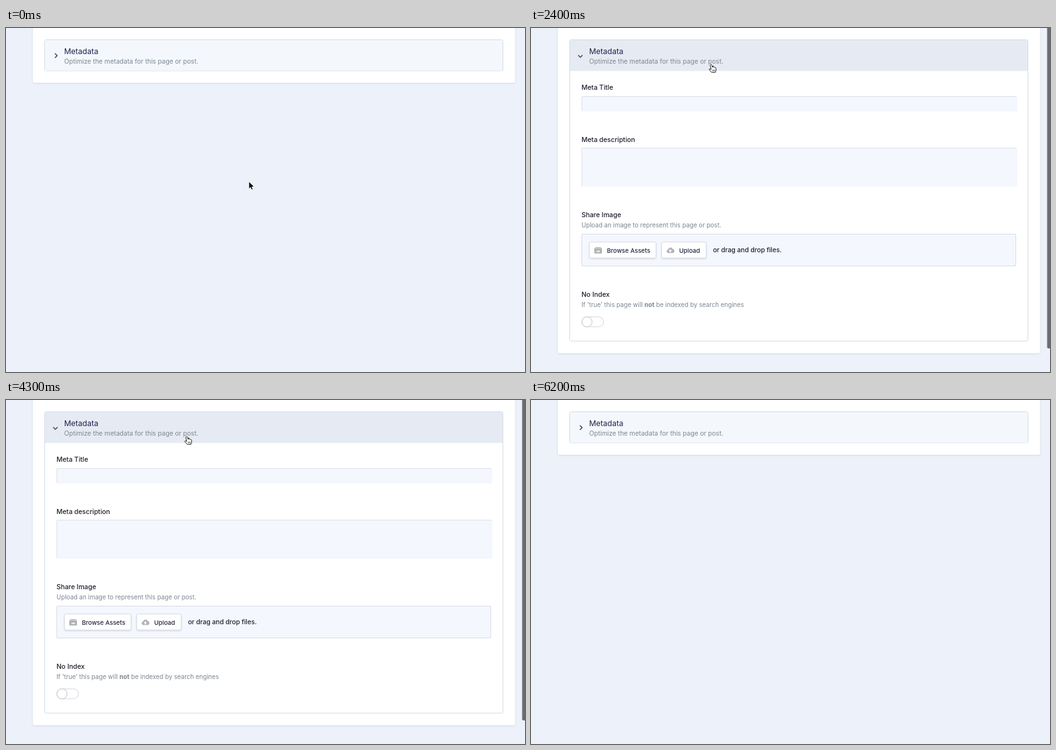
An HTML page for the animation above (6.5 s loop, 812x540 px).

```html
<!DOCTYPE html>
<html lang="en">
<head>
<meta charset="utf-8">
<title>Metadata panel</title>
<style>
  html, body { margin: 0; width: 100%; height: 100%; overflow: hidden; background: #edf2fa; }
  svg { display: block; width: 812px; height: 540px; }
  text { font-family: Inter, "Open Sans", sans-serif; fill: #1d1f2b; }
  .title { font-size: 12px; fill: #20224a; }
  .sub { font-size: 10.1px; fill: #7c8791; }
  .label { font-size: 10.4px; font-weight: 500; }
  .hint { font-size: 9.72px; fill: #7c8791; }
  .button { font-size: 9.6px; font-weight: 500; fill: #24263f; }
  .drop { font-size: 10.2px; font-weight: 500; }
  .card { fill: #fff; filter: drop-shadow(0 1px 1.5px #a9b4c566); }
  .panel { fill: #fff; stroke: #d5dce6; }
  .field { fill: #f4f7fd; }
  .edge { stroke: #dae0e9; fill: none; }
  .btn { fill: #fff; stroke: #d9dee7; filter: drop-shadow(0 1px 1px #8a94a855); }
  .icon { fill: #b1b3b7; }
  .chevron { fill: none; stroke: #42465c; stroke-width: 1.5; stroke-linecap: round; stroke-linejoin: round; }
</style>
</head>
<body>
<svg viewBox="0 0 812 540">
  <rect width="812" height="540" fill="#edf2fa"/>
  <rect id="card" class="card" x="42" y="-10" width="754.5" height="96" rx="3"/>
  <rect id="panel" class="panel" x="60.5" y="18.5" width="717" height="49.5" rx="2"/>
  <path id="head" d="M61 19H777V67.5H61Z"/>
  <path id="chevron" class="chevron"/>
  <text class="title" x="91" y="41">Metadata</text>
  <text class="sub" x="91" y="56">Optimize the metadata for this page or post.</text>

  <g id="form">
    <text class="label" x="79" y="97.3">Meta Title</text>
    <rect class="field" x="79" y="107" width="682" height="24" rx="2"/>
    <path class="edge" d="M79.5 130V109Q79.5 107.5 81 107.5H759"/>

    <text class="label" x="79" y="178.8">Meta description</text>
    <rect class="field" x="79" y="188" width="682" height="61" rx="2"/>
    <path class="edge" d="M79.5 248V190Q79.5 188.5 81 188.5H759"/>

    <text class="label" x="79" y="296.8">Share Image</text>
    <text class="hint" x="79" y="313.4">Upload an image to represent this page or post.</text>
    <rect x="79.5" y="323.5" width="679" height="50" rx="1.5" fill="#f4f7fd" stroke="#d5dce6"/>
    <rect class="btn" x="91.5" y="336" width="104" height="25" rx="2"/>
    <g class="icon">
      <path d="M100.5 344h9v1h-9Z"/>
      <path fill-rule="evenodd" d="M100 345.5h10q1 0 1 1v6.500q0 1-1 1h-10q-1 0-1-1v-6.500q0-1 1-1ZM102 351.500h6l-2-3-1.500 2-1-1Z"/>
    </g>
    <text class="button" x="118.7" y="352.6">Browse Assets</text>
    <rect class="btn" x="204.500" y="336" width="69.500" height="25" rx="2"/>
    <path class="icon" fill-rule="evenodd" d="M214.800 353.300a2.900 2.900 0 0 1-.3-5.700a3.700 3.700 0 0 1 7-.8a3.300 3.300 0 0 1 .1 6.500ZM218 347.300l-2.700 2.800h1.700v2h2v-2h1.700Z"/>
    <text class="button" x="231.7" y="352.6">Upload</text>
    <text class="drop" x="284.700" y="352.400">or drag and drop files.</text>

    <text class="label" x="79" y="421.700">No Index</text>
    <text class="hint" x="79" y="438.200">If 'true' this page will <tspan font-weight="700">not</tspan> be indexed by search engines</text>
    <rect x="79.500" y="453.500" width="34" height="15.500" rx="7.750" fill="#fff" stroke="#d3d6dc"/>
    <circle cx="87.600" cy="461.300" r="7.900" fill="#fff" stroke="#bfc3ca"/>
    <path d="M807.500 0H812V503H809.500Q807.500 503 807.500 501Z" fill="#6c6d72"/>
  </g>

  <g id="cursor" stroke-linejoin="round">
    <path id="arrow" d="M0 0V11.600L2.600 9.200L4.300 13.100L6.400 12.200L4.700 8.400H8.300Z" fill="#000" stroke="#fff" stroke-width=".8"/>
    <path id="hand" d="M-1.500 .8Q-.6-.7.5.6L1.900 4.700Q3-.0 3.900 4.600Q5.200 3.900 5.700 5.200Q7.400 4.800 7.500 6.700V9.200L6.300 12.700H.6L-2.900 8.700Q-3.700 7 -1.900 7.100L-.2 8.200L-1.600 1.800Z" fill="#fff" stroke="#222" stroke-width="1"/>
    <path id="fingers" d="M2 8.400V11M3.700 8.400V11M5.300 8.400V11" stroke="#222" stroke-width=".7"/>
  </g>
</svg>

<script>
const LOOP = 6500, STEP = 100;
const $ = id => document.getElementById(id);
const show = (id, on) => $(id).setAttribute("visibility", on ? "visible" : "hidden");

// time, x, y of the pointer tip
const path = [
  [0, 380, 241], [700, 373, 221], [1400, 296, 77], [1600, 296, 77],
  [2000, 282, 57], [3800, 282, 57], [4000, 283, 57], [5200, 283, 57],
  [6100, 446, -18], [LOOP, 446, -18]
];
const openSpans = [[2400, 3200], [4300, 5100]];

function pointerAt(t) {
  const i = path.findIndex(p => p[0] > t);
  const [t0, x0, y0] = path[i - 1], [t1, x1, y1] = path[i];
  const u = (t - t0) / (t1 - t0), e = u * u * (3 - 2 * u);
  return [x0 + (x1 - x0) * e, y0 + (y1 - y0) * e];
}

function draw(t) {
  const [x, y] = pointerAt(t);
  const open = openSpans.some(([a, b]) => t >= a && t < b);
  const hover = y >= 18 && y < 68;

  $("card").setAttribute("height", open ? 520.5 : 96);
  $("panel").setAttribute("height", open ? 473 : 49);
  $("head").setAttribute("fill", hover ? "#e6ebf3" : "#f4f7fc");
  $("chevron").setAttribute("d", open ? "M74.200 43L77.200 46L80.200 43" : "M76.900 40.300L80 43.400L76.900 46.500");
  show("form", open);

  $("cursor").setAttribute("transform", `translate(${Math.round(x)} ${Math.round(y)})`);
  show("arrow", !hover);
  show("hand", hover);
  show("fingers", hover);
}

const start = performance.now();
function tick() {
  const t = (performance.now() - start) % LOOP;
  draw(Math.floor(t / STEP) * STEP);
  requestAnimationFrame(tick);
}
tick();
</script>
</body>
</html>
```
